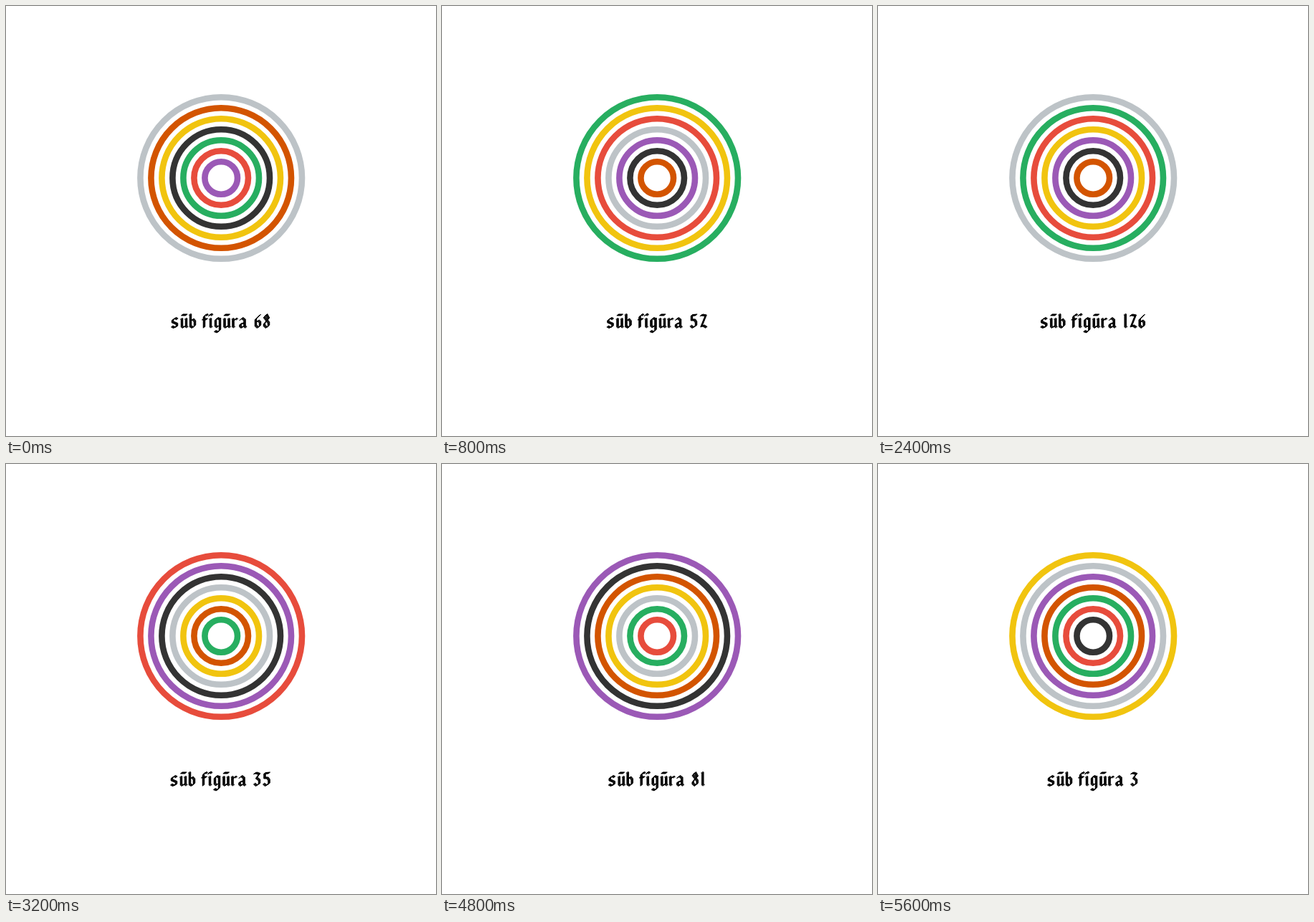
Animation, 600 px wide and 600 px high, one loop 6400 ms. Source, as an HTML page with a canvas:

```html
<!DOCTYPE html>
<html lang="la">
<head>
<meta charset="utf-8">
<title>Rings</title>
<style>
  html, body { margin: 0; width: 100%; height: 100%; overflow: hidden; background: #fff; }
  canvas { display: block; width: 600px; height: 600px; }
</style>
</head>
<body>
<canvas id="stage" width="600" height="600" role="img"></canvas>
<script>
const canvas = document.getElementById('stage');
const ctx = canvas.getContext('2d');

const HOLD = 800;
const COLORS = {
  silver: '#bdc3c7', orange: '#d35400', yellow: '#f1c40f', black: '#333333',
  green: '#27ae60', red: '#e74c3c', purple: '#9b59b6'
};

// Ring colours from the outside in.
const CARDS = [
  ['68', 'silver orange yellow black green red purple'],
  ['52', 'green yellow red silver purple black orange'],
  ['39', 'black silver green orange red purple yellow'],
  ['126', 'silver green red yellow purple black orange'],
  ['35', 'red purple black silver yellow orange green'],
  ['93', 'yellow red silver black green purple orange'],
  ['81', 'purple black orange yellow silver green red'],
  ['3', 'yellow silver purple orange green red black']
].map(([number, rings]) => ({ text: 'sūb fîgūra ' + number, rings: rings.split(' ') }));

// Blackletter pen strokes: advance width and path, with the baseline at y = 0.
const minim = x => `M${x - 1} -14 l1 1 v10 l1.5 1.5`;
const macronU = minim(3) + 'L8.5 -4' + minim(9) + 'M3 -19 H9.5';
const six = 'M9 -19 L3 -13 V-4 L6 -1.5 L9 -4 V-9 L6.5 -11 L3 -8';

const GLYPHS = {
  ' ': [7],
  s: [13, 'M9.5 -13 L7 -14.5 L3 -12 V-9 L9 -6.5 V-3 L5 -1.5 L2 -3'],
  ū: [12, macronU],
  b: [12, 'M2 -20 l1 1 V-3 L6 -1.5 L9 -4 V-10 L6.5 -13 L3 -10'],
  f: [9, 'M8 -18.5 L6 -19.5 L3 -17 V-1.5 M1 -13 H7'],
  î: [7, minim(3) + 'M1 -18 L3.5 -20 L5.5 -18.5'],
  g: [12.5, 'M9 -13 L5.5 -14.5 L3 -12 V-4 L5 -2 L9 -5 M9 -14 V2 L6 5 L2 3.5'],
  r: [10, minim(3) + 'M3 -10 L7 -14 L8.5 -12.5'],
  a: [14.5, 'M3 -12 L5.5 -14.5 L9 -12 V-3 L11 -1.5 M9 -8 L3 -6 V-3 L5 -1.5 L9 -4'],
  1: [8.5, 'M2.5 -20 l1 1 V-3 l1.5 1.5'],
  2: [12, 'M2 -18 L4 -19 L9 -18 L3 -3 L6 -4 L10 -1.5'],
  3: [13, 'M2 -18 L4.5 -19 L9 -17.5 L5 -12 L9 -9 V-4 L5 -1.5 L2 -4'],
  5: [14, 'M10 -19 L3.5 -18.5 V-12 H7.5 L9.5 -9 V-4 L5 -1.5 L2 -4'],
  6: [12, six],
  8: [13, 'M6 -19.5 L3 -16 L9 -8 V-4 L6 -1.5 L3 -4 V-7 L9 -14 Z'],
  9: [11, six, true]
};

function drawGlyph([, path, turned], x, y) {
  if (!path) return;
  const shape = new Path2D(path);
  ctx.save();
  ctx.translate(x, y);
  if (turned) {
    ctx.translate(12, -21);
    ctx.rotate(Math.PI);
  }
  // Sweep a slanted broad nib along the path.
  for (let k = -1; k <= 1; k += 0.25) {
    ctx.save();
    ctx.translate(k * 1.3, -k);
    ctx.stroke(shape);
    ctx.restore();
  }
  ctx.restore();
}

function drawText(text, centerX, baseline) {
  const glyphs = [...text].map(char => GLYPHS[char]);
  let x = centerX - glyphs.reduce((sum, [advance]) => sum + advance, 0) / 2;
  ctx.strokeStyle = '#000';
  ctx.lineWidth = 0.8;
  for (const glyph of glyphs) {
    drawGlyph(glyph, x, baseline);
    x += glyph[0];
  }
}

function drawRings(names) {
  ctx.lineWidth = 8.6;
  names.forEach((name, i) => {
    ctx.strokeStyle = COLORS[name];
    ctx.beginPath();
    ctx.arc(300.2, 240, 112.8 - 15 * i, 0, Math.PI * 2);
    ctx.stroke();
  });
}

const start = performance.now();
let shown;

function frame() {
  const elapsed = Math.max(0, performance.now() - start);
  const card = CARDS[Math.floor(elapsed / HOLD) % CARDS.length];
  if (card !== shown) {
    shown = card;
    ctx.fillStyle = '#fff';
    ctx.fillRect(0, 0, 600, 600);
    drawRings(card.rings);
    drawText(card.text, 300, 450);
    canvas.setAttribute('aria-label', card.text);
  }
  requestAnimationFrame(frame);
}
frame();
</script>
</body>
</html>
```
